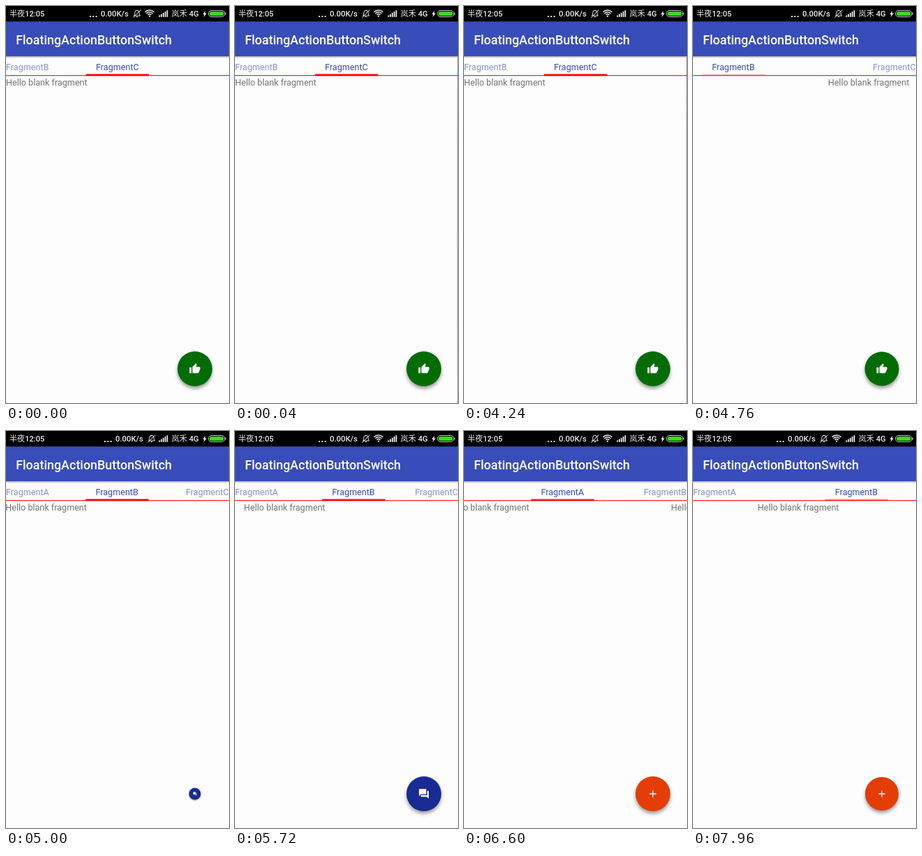
Animation, 320 px wide and 569 px high, one loop 8000 ms. Source, as an HTML page with a canvas:

```html
<!DOCTYPE html>
<html lang="en">
<head>
<meta charset="utf-8">
<title>FloatingActionButtonSwitch</title>
<style>
html, body { margin: 0; width: 100%; height: 100%; overflow: hidden; background: #fdfdfd; }
canvas { display: block; width: 100vw; height: 100vh; }
</style>
</head>
<body>
<canvas id="stage"></canvas>
<script>
const W = 320, H = 569, LOOP = 8000, STEP = 40;
const canvas = document.getElementById('stage');
const ctx = canvas.getContext('2d');
const dpr = window.devicePixelRatio || 1;
canvas.width = W * dpr;
canvas.height = H * dpr;

const FONT = 'Roboto, "Noto Sans CJK SC", "Noto Sans CJK", sans-serif';
const PRIMARY = '#384cba', INK = '#3a4db3', ACCENT = '#ff0000';
const TABS = ['FragmentA', 'FragmentB', 'FragmentC'];

// One button per page
const BUTTONS = [
  { color: '#e43d06', icon: 'M19 13h-6v6h-2v-6H5v-2h6V5h2v6h6v2z' },
  { color: '#1a2b93', icon: 'M21 6h-2v9H6v2c0 .55.45 1 1 1h11l4 4V7c0-.55-.45-1-1-1zm-4 6V3c0-.55-.45-1-1-1H3c-.55 0-1 .45-1 1v14l4-4h10c.55 0 1-.45 1-1z' },
  { color: '#046c05', icon: 'M1 21h4V9H1v12zm22-11c0-1.1-.9-2-2-2h-6.31l.95-4.57.03-.32c0-.41-.17-.79-.44-1.06L14.17 1 7.59 7.59C7.22 7.95 7 8.45 7 9v10c0 1.1.9 2 2 2h9c.83 0 1.54-.5 1.84-1.22l3.02-7.05c.09-.23.14-.47.14-.73v-1.91l-.01-.01L23 10z' }
].map(b => ({ color: b.color, icon: new Path2D(b.icon) }));

const clamp = v => Math.max(0, Math.min(1, v));

// Piecewise linear track of [time, value]
function track(keys, t) {
  let [t0, v0] = keys[0];
  for (const [t1, v1] of keys) {
    if (t < t1) return t1 > t0 ? v0 + (v1 - v0) * (t - t0) / (t1 - t0) : v0;
    t0 = t1;
    v0 = v1;
  }
  return v0;
}

// cubic-bezier(.4, 0, .2, 1)
function fastOutSlowIn(x) {
  let lo = 0, hi = 1, u = x;
  for (let i = 0; i < 20; i++) {
    u = (lo + hi) / 2;
    const bx = 1.2 * u * (1 - u) ** 2 + 0.6 * u * u * (1 - u) + u ** 3;
    if (bx < x) lo = u; else hi = u;
  }
  return 3 * u * u * (1 - u) + u ** 3;
}

// Swipes: finger drag along a track, then a quintic settle
const SWIPES = [
  { drag: [[4360, 2], [4500, 1.9], [4742, 1.5]], release: 4742, settle: 390, from: 2, to: 1 },
  { drag: [[5720, 0.96], [6000, 0.31]], release: 6000, settle: 360, from: 1, to: 0 },
  { drag: [[6600, 0.072], [7919, 0.072], [7920, 0.49], [7936, 0.56]], release: 7936, settle: 300, from: 0, to: 1 }
];
const GLOW = [[0, 0], [39, 0], [40, 0.1], [2800, 0.1], [2940, 1], [3480, 0.03], [3680, 0],
  [3960, 0], [4000, 0.1], [4100, 0.4], [4240, 0.1], [4400, 0]];

function scrollAt(t) {
  let pos = SWIPES[0].from;
  for (const s of SWIPES) {
    if (t < s.drag[0][0]) break;
    pos = track(s.drag, t);
    if (t > s.release) {
      const left = 1 - clamp((t - s.release) / s.settle);
      pos = s.to + (pos - s.to) * left ** 5;
    }
  }
  return pos;
}

function buttonAt(t) {
  let page = 2, scale = 1;
  for (const s of SWIPES) {
    const dt = t - s.release;
    if (dt < 0) break;
    page = dt < 200 ? s.from : s.to;
    scale = dt < 200 ? 1 - fastOutSlowIn(dt / 200) : fastOutSlowIn(clamp((dt - 200) / 200));
  }
  return { page, scale };
}

function rect(x, y, w, h, color) {
  ctx.fillStyle = color;
  ctx.fillRect(x, y, w, h);
}

function text(str, x, y, size, color, weight = 400) {
  ctx.font = `${weight} ${size}px ${FONT}`;
  ctx.fillStyle = color;
  ctx.fillText(str, x, y);
}

function pill(x, y, w, h) {
  ctx.beginPath();
  ctx.roundRect(x, y, w, h, h / 2);
}

function drawBell(x) {
  ctx.lineWidth = 1;
  ctx.stroke(new Path2D(`M${x + 1.5} 14h9l-1.3-2V9.5a3.2 3.2 0 0 0-6.4 0V12zM${x + 0.5} 16.5L${x + 11.5} 5.5`));
  ctx.fillRect(x + 5, 15, 2, 1);
}

function drawWifi(x, y) {
  ctx.lineWidth = 1.5;
  for (const r of [3.4, 6.2, 9]) {
    ctx.beginPath();
    ctx.arc(x, y, r, -Math.PI * 0.76, -Math.PI * 0.24);
    ctx.stroke();
  }
  ctx.beginPath();
  ctx.arc(x, y - 0.4, 1.2, 0, 7);
  ctx.fill();
}

function drawStatusBar(wifi) {
  const dx = wifi ? 0 : 21, tone = '#ececec';
  rect(0, 0, W, 22.2, '#000');
  text('半夜12:05', 5, 15.2, 11.1, tone, 500);
  for (let i = 0; i < 3; i++) rect(120 + dx + i * 4.3, 14, 2, 2, tone);
  text('0.00K/s', 136 + dx, 15.2, 11.3, tone, 500);
  ctx.strokeStyle = ctx.fillStyle = tone;
  drawBell(182 + dx);
  if (wifi) drawWifi(206, 15);
  for (let i = 0; i < 5; i++) rect(219.3 + i * 2.8, 13.4 - i * 1.8, 1.8, 2.4 + i * 1.8, tone);
  text('岚禾 4G', 237.5, 15.2, 11.2, tone, 500);
  ctx.fill(new Path2D('M286 7l-3.5 5h2l-1 4 4.5-5.5h-2.2z'));
  ctx.strokeStyle = '#ccc';
  ctx.lineWidth = 1;
  pill(290.5, 6.5, 23.5, 9);
  ctx.stroke();
  rect(314.5, 9.5, 1.2, 3, '#ccc');
  ctx.fillStyle = '#3fd424';
  pill(292, 8, 20.5, 6);
  ctx.fill();
}

function drawToolbar() {
  const fade = ctx.createLinearGradient(0, 72, 0, 75);
  fade.addColorStop(0, 'rgba(0,0,0,.32)');
  fade.addColorStop(1, 'rgba(0,0,0,0)');
  rect(0, 72, W, 3, fade);
  rect(0, 22, W, 50, PRIMARY);
  text('FloatingActionButtonSwitch', 14.2, 54.5, 17.9, '#fff', 500);
}

// Tab strip: the current title slides, its neighbours stick to the edges
function drawTabs(pos) {
  const base = Math.floor(pos), frac = pos - base;
  const cur = frac > 0.5 ? base + 1 : base;
  const width = 62, gap = 57, pad = 14.2, bottom = 100.2;
  const left = W - width - (W - width) * (frac > 0.5 ? frac - 0.5 : frac + 0.5);
  const title = (i, x) => TABS[i] && text(TABS[i], x, 91.9, 12.6, INK);

  title(cur, left);
  ctx.globalAlpha = 0.6;
  title(cur - 1, Math.min(0, left - gap - width));
  title(cur + 1, Math.max(W - width, left + width + gap));
  ctx.globalAlpha = Math.abs(frac - 0.5) * 2;
  rect(left - pad, bottom - 2.7, width + 2 * pad, 2.7, ACCENT);
  ctx.globalAlpha = 1;
  rect(0, bottom - 1.05, W, 1.05, ACCENT);
}

function drawPages(pos) {
  TABS.forEach((_, i) => {
    const x = (i - pos) * W;
    if (Math.abs(x) < W) text('Hello blank fragment', x, 113.9, 12.6, '#747474');
  });
}

function drawGlow(amount) {
  if (amount <= 0) return;
  rect(W - 1, 73, 1, H - 73, `rgba(70,70,75,${0.4 * Math.min(1, amount * 10)})`);
  ctx.fillStyle = 'rgba(70,70,75,.12)';
  ctx.beginPath();
  ctx.ellipse(W, 321, 22 * amount, 290, 0, 0, 7);
  ctx.save();
  ctx.clip();
  ctx.fillRect(0, 73, W, H - 73);
  ctx.restore();
}

function drawButton({ page, scale }) {
  if (scale < 0.01) return;
  const { color, icon } = BUTTONS[page];
  ctx.save();
  ctx.translate(271, 520);
  ctx.scale(scale, scale);
  ctx.shadowColor = 'rgba(0,0,0,.38)';
  ctx.shadowBlur = 5 * scale * dpr;
  ctx.shadowOffsetY = 3.5 * scale * dpr;
  ctx.fillStyle = color;
  ctx.beginPath();
  ctx.arc(0, 0, 25, 0, 7);
  ctx.fill();
  ctx.shadowColor = 'transparent';
  ctx.scale(0.7, 0.7);
  ctx.translate(-12, -12);
  ctx.fillStyle = '#fff';
  ctx.fill(icon);
  ctx.restore();
}

function draw(t) {
  const pos = scrollAt(t);
  ctx.setTransform(dpr, 0, 0, dpr, 0, 0);
  rect(0, 0, W, H, '#fdfdfd');
  drawPages(pos);
  drawTabs(pos);
  drawGlow(track(GLOW, t));
  drawToolbar();
  drawStatusBar(t < 4640 || t >= 5360);
  drawButton(buttonAt(t));
}

const start = performance.now();
function tick() {
  const t = (performance.now() - start) % LOOP;
  draw(Math.floor(t / STEP) * STEP);
  requestAnimationFrame(tick);
}
tick();
</script>
</body>
</html>
```
